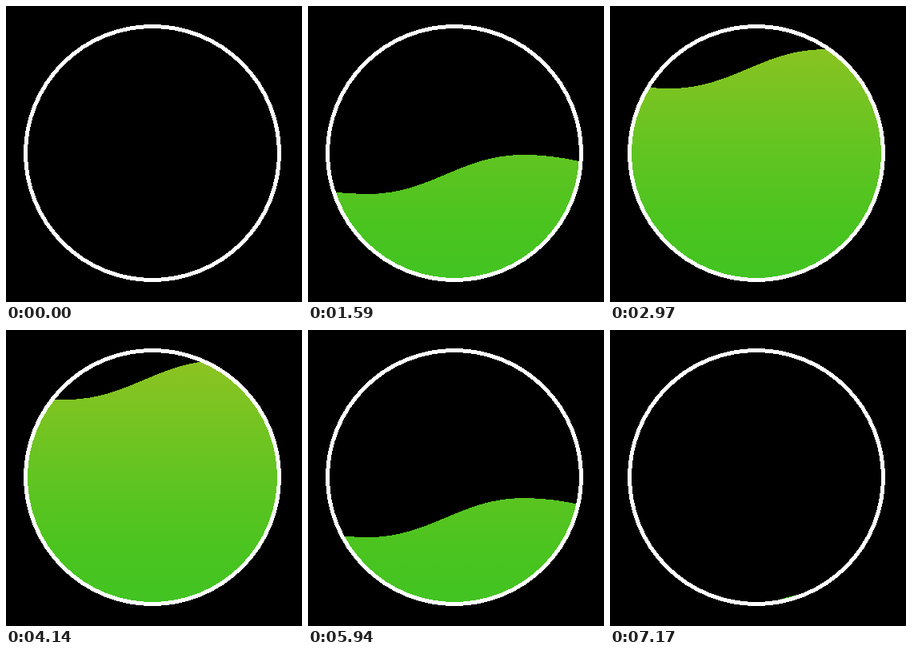
Write an HTML page that moves like this. It is 370 px wide and 370 px high and loops after 7270 ms.

```html
<!DOCTYPE html>
<html lang="en">
<head>
<meta charset="utf-8">
<title>Filling circle</title>
<style>
  html, body { margin: 0; width: 100%; height: 100%; overflow: hidden; background: #000; }
  svg { display: block; width: 100vw; height: 100vh; }
</style>
</head>
<body>
<svg viewBox="0 0 370 370" shape-rendering="crispEdges">
  <defs>
    <linearGradient id="liquid" gradientUnits="userSpaceOnUse" x1="0" y1="28" x2="0" y2="340">
      <stop offset="0" stop-color="#90c322"/>
      <stop offset=".5" stop-color="#61c421"/>
      <stop offset=".78" stop-color="#4bc41f"/>
      <stop offset="1" stop-color="#42c422"/>
    </linearGradient>
    <clipPath id="bowl"><circle cx="183" cy="184" r="158"/></clipPath>
  </defs>
  <path id="wave" fill="url(#liquid)" clip-path="url(#bowl)"/>
  <circle cx="183" cy="184" r="158.5" fill="none" stroke="#fff" stroke-width="5"/>
</svg>
<script>
  const LOOP = 7270, STEP = 30, LAST = 7170, TURN = 3639;
  const EMPTY = 338, SPEED = 0.0956;
  const wave = document.getElementById('wave');

  // Outline of the liquid, given the height of its crest.
  function wavePath(crest) {
    const y = offset => (crest + offset).toFixed(2);
    return `M15 ${y(44.3)} Q45 ${y(49)} 75 ${y(49)}` +
      `C153 ${y(49)} 191 ${y(0)} 269 ${y(0)}` +
      `Q309 ${y(0)} 349 ${y(10.6)} V370 H15 Z`;
  }

  // The level rises and falls at a constant speed, in discrete steps.
  function render(time) {
    const t = Math.min(LAST, Math.floor((time % LOOP) / STEP) * STEP);
    const travel = TURN - Math.abs(t - TURN);
    wave.setAttribute('d', wavePath(EMPTY - SPEED * travel));
  }

  const start = performance.now();
  function tick() {
    render(performance.now() - start);
    requestAnimationFrame(tick);
  }
  tick();
</script>
</body>
</html>
```
